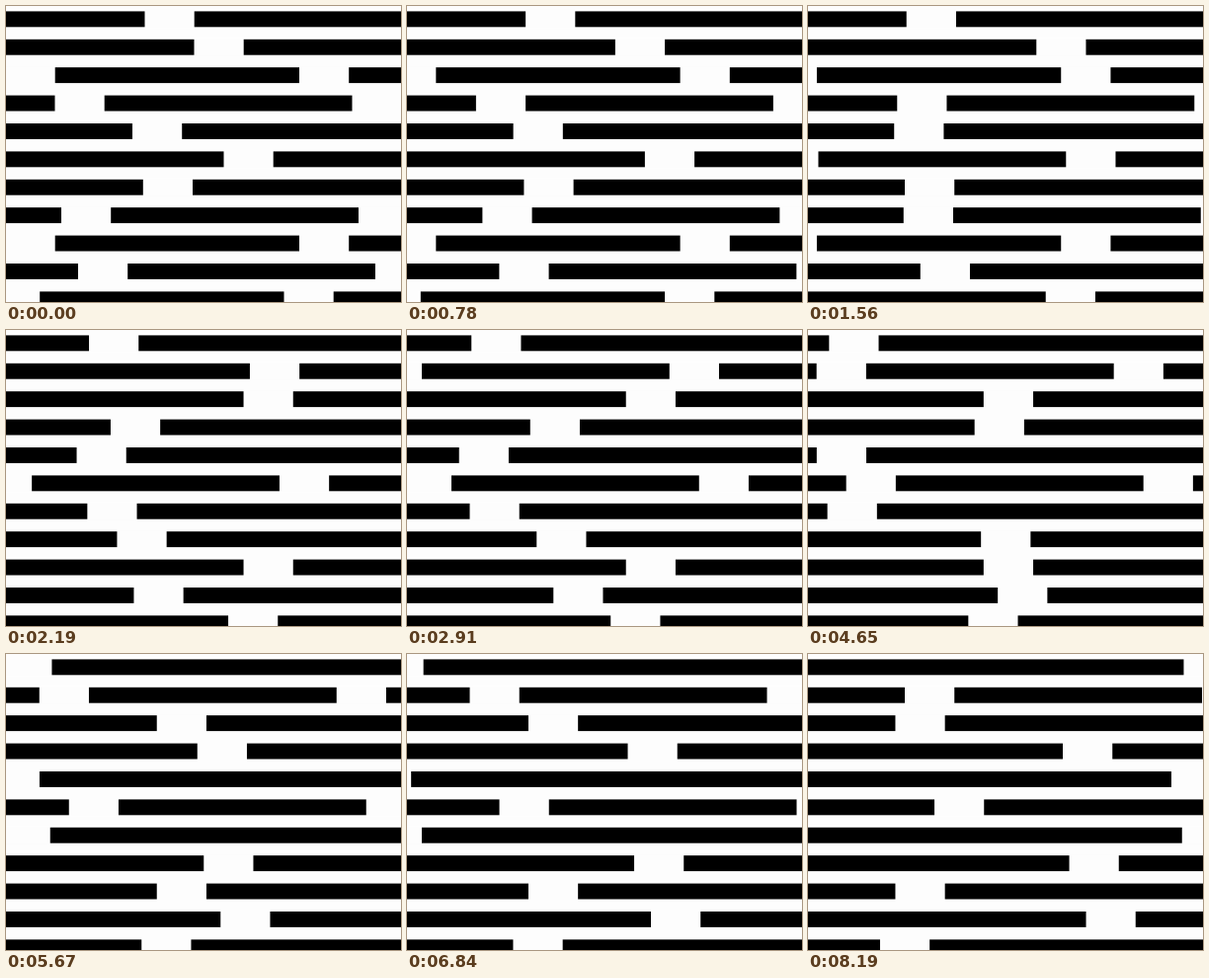
An HTML page for the animation above (8.25 s loop, 400x300 px).

```html
<!DOCTYPE html>
<html lang="en">
<head>
<meta charset="utf-8">
<title>Sliding bars</title>
<style>
  html, body { margin: 0; width: 100%; height: 100%; overflow: hidden; background: #fdfdfd; }
  svg { display: block; width: 100vw; height: 100vh; }
</style>
</head>
<body>
<svg id="stage" viewBox="0 0 400 300"></svg>
<script>
const LOOP = 8250;
const STEPS = 134;
const STEP_WIDTH = 1.568;
const ROW = { top: 5.4, pitch: 28.4, height: 15.9 };
const GAP = 50.2;
const PERIOD = 746;

// Where each row's strip starts; every strip is a short and a long bar, repeating.
const phases = [-157, -110.5, -0.5, 49.5, -169.5, -80.5, -158.7, 56, -0.5, 73, -16];

const stage = document.getElementById("stage");

function add(parent, tag, attributes = {}) {
  const node = document.createElementNS("http://www.w3.org/2000/svg", tag);
  for (const [name, value] of Object.entries(attributes)) node.setAttribute(name, value);
  return parent.appendChild(node);
}

const rows = phases.map((phase, i) => {
  const direction = i % 2 ? 1 : -1;
  const spacing = direction > 0 ? 301 : 297.5;
  const y = ROW.top + i * ROW.pitch;
  add(stage, "rect", { x: 0, y, width: 400, height: ROW.height });
  const gaps = add(stage, "g", { fill: "#fdfdfd" });
  for (const offset of [0, spacing, PERIOD]) {
    add(gaps, "rect", { x: phase + offset, y: y - 1, width: GAP, height: ROW.height + 2 });
  }
  return { gaps, direction };
});

function draw(time) {
  const step = Math.min(STEPS - 1, Math.floor((time % LOOP) / LOOP * STEPS + 0.72));
  for (const { gaps, direction } of rows) {
    gaps.setAttribute("transform", `translate(${direction * step * STEP_WIDTH} 0)`);
  }
}

const begin = performance.now();
function tick() {
  draw(performance.now() - begin);
  requestAnimationFrame(tick);
}
tick();
</script>
</body>
</html>
```
